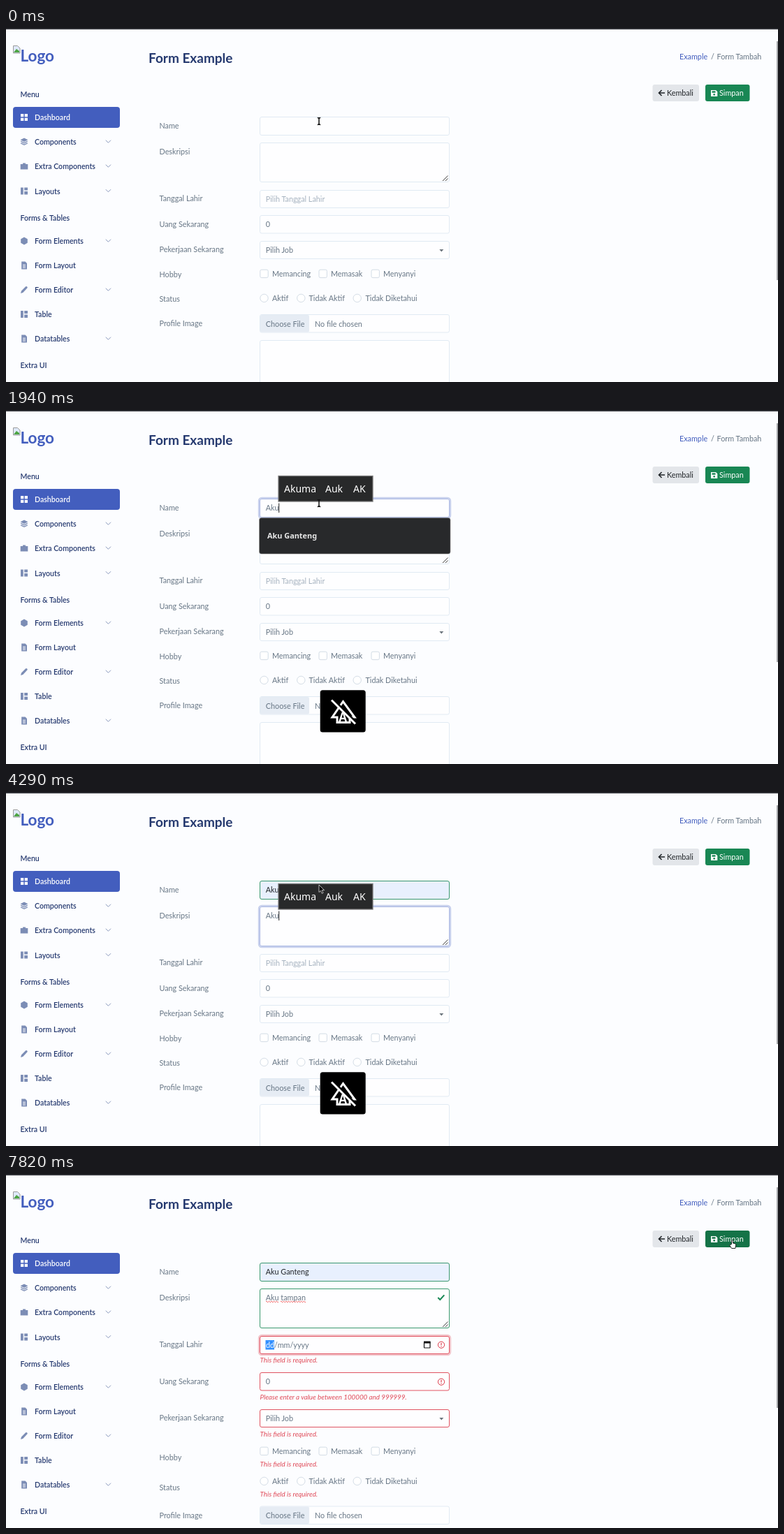
These frames come from a looping animation (1105x507 px, 7.99 s). An HTML page:

```html
<!DOCTYPE html>
<html lang="id">
<head>
<meta charset="utf-8">
<title>Form Example</title>
<style>
html, body { margin: 0; width: 100%; height: 100%; overflow: hidden; background: #fcfdff; }
svg { display: block; width: 1105px; height: 507px; }
text { font: 10.8px Lato, "Open Sans", sans-serif; fill: #677685; white-space: pre; }
.menu { font-size: 10.6px; font-weight: 600; fill: #25396f; }
.title { font-size: 19px; font-weight: 700; fill: #25396f; }
.logo { font-size: 22.5px; font-weight: 700; fill: #435ebe; }
.link { fill: #435ebe; }
.white { fill: #fff; }
.dark { fill: #212529; }
.faint { fill: #a5b2bf; }
.error { font-size: 9.8px; font-style: italic; fill: #e04a58; }
.option { font: 700 10.9px "Noto Sans", sans-serif; fill: #e8e8e8; }
.hint { font: 14px "Noto Sans", sans-serif; fill: #fff; }
.plain { font: 13.3px "Liberation Sans", sans-serif; fill: #fff; }
.caps { font: 700 17px "Noto Sans", sans-serif; fill: #fff; }
</style>
</head>
<body>
<svg id="stage" viewBox="0 0 1105 507"></svg>
<script>
const LOOP = 7990;
const BORDER = '#dce7f1', GREEN = '#198754', RED = '#dc3545', ICON = '#7c8db5';

const text = (x, y, s, cls = '') => `<text x="${x}" y="${y}" class="${cls}">${s}</text>`;
const rect = (x, y, w, h, fill, r = 0, extra = '') =>
  `<rect x="${x}" y="${y}" width="${w}" height="${h}" rx="${r}" fill="${fill}" ${extra}/>`;
const path = (d, fill, extra = '') => `<path d="${d}" fill="${fill}" ${extra}/>`;
const line = (d, color, width = 1) => path(d, 'none', `stroke="${color}" stroke-width="${width}"`);
const group = (x, y, body) => `<g transform="translate(${x} ${y})">${body}</g>`;
// Last value whose time has come
const at = (t, keys) => keys.reduce((value, [start, next]) => t >= start ? next : value, keys[0][1]);
const within = (t, start, end) => t >= start && t < end;

const icons = {
  grid: 'M-5-5h4.3v4.3h-4.3zM.7-5H5v4.3H.7zM-5 .7h4.3V5h-4.3zM.7.7H5V5H.7z',
  stack: 'M0-5.5L5.5-2.7 0 .1-5.5-2.7zM-5.5-.3l1.5-.7L0 1l4-2 1.5.7L0 2.5zM-5.5 2.2L-4 1.5l4 2 4-2 1.5.7L0 5z',
  bag: 'M-2-4.5h4v1.5h3.3V4.5h-10.6V-3H-2z',
  columns: 'M-5-5h3.8V5H-5zM.2-5H5v4H.2zM.2.4H5V5H.2z',
  hexagon: 'M0-5.6L4.8-2.8V2.8L0 5.6-4.8 2.8V-2.8z',
  file: 'M-3.8-5.5H1.5L4-3V5.5H-3.8z',
  pen: 'M-5 5l1-3.5L2.2-4.7q1-.8 2 .2t.2 2L-1.7 4z'
};
const menu = [
  [128, 'Dashboard', 'grid'], [163, 'Components', 'stack', 1], [198, 'Extra Components', 'bag', 1],
  [233.5, 'Layouts', 'columns', 1], [305, 'Form Elements', 'hexagon', 1], [340, 'Form Layout', 'file'],
  [375, 'Form Editor', 'pen', 1], [410, 'Table', 'columns'], [445, 'Datatables', 'file', 1]
];

function sidebar() {
  const items = menu.map(([y, label, icon, opens], i) =>
    group(26, y, path(icons[icon], i ? ICON : '#fff')
      + (icon === 'file' ? line('M-2-.8H2M-2 1.2H2M-2 3.2H2', '#fff', .9) : ''))
    + text(41, y + 4, label, i ? 'menu' : 'menu white')
    + (opens ? line(`M142.8 ${y - 2.3}l3.6 3.6 3.6-3.6`, ICON, .9) : ''));
  return path('M10.5 25.5h6l3.5 3.5v7h-9.5z', '#dfe9fb', 'stroke="#9a9a9a"')
    + path('M11 35l4-5 4 3v2z', '#4da544')
    + text(20.5, 47.5, 'Logo', 'logo')
    + rect(10, 113, 153, 30, '#435ebe', 4) + items.join('')
    + text(20.5, 98.5, 'Menu', 'menu') + text(20.5, 275.5, 'Forms &amp; Tables', 'menu')
    + text(20.5, 487, 'Extra UI', 'menu');
}

function header(hover) {
  return rect(0, 0, 1105, 2, '#303136')
    + text(204, 50, 'Form Example', 'title')
    + text(964, 45, 'Example', 'link') + text(1009, 45, '/') + text(1017.5, 45, 'Form Tambah')
    + rect(925.5, 81, 66.5, 24, '#e3e6ea', 3) + line('M943 93h-8M938.5 89l-4 4 4 4', '#212529', 1.6)
    + text(946, 97, 'Kembali', 'dark')
    + rect(1001, 81, 63.5, 24, hover ? '#157347' : GREEN, 3)
    + path('M1009 89h7l2.3 2.3v6.7h-9.3zM1010.5 90.3v2.4h5v-2.4zM1013.6 94a1.4 1.4 0 1 0 .1 0z', '#fff', 'fill-rule="evenodd"')
    + text(1021, 97, 'Simpan', 'white');
}

const glow = (y, h, rgb) => rect(362, y - 1.5, 274, h + 3, 'none', 4, `stroke="rgb(${rgb})" stroke-opacity=".28" stroke-width="2.4"`);
const field = (y, h, color = BORDER, fill = '#fefeff') => rect(363.5, y, 271, h, fill, 2.5, `stroke="${color}" stroke-width=".85"`);
const squiggle = (from, to, y) => line(`M${from} ${y}` + 'q.9-1.6 1.8 0t1.8 0'.repeat(Math.round((to - from) / 3.6)), '#e33', .8);
const alertIcon = y => `<circle cx="623" cy="${y}" r="4.6" fill="none" stroke="${RED}"/>`
  + line(`M623 ${y - 2.6}v3M623 ${y + 1.4}v1.2`, RED, 1.2);

function choices(y, labels, radius) {
  return labels.map(([x, label, textX]) =>
    rect(x, y - 5.8, 11.4, 11.4, '#fff', radius, `stroke="#cfd8e2" stroke-width=".9"`) + text(textX, y + 4, label)).join('');
}

function errors(money) {
  const required = [270, 375.5, 419, 462];
  return rect(371.5, 238, 12.5, 13.5, '#3390ff') + text(372, 248.7, '<tspan class="white">dd</tspan>/mm/yyyy')
    + rect(598.5, 240.5, 8.5, 8.5, 'none', .5, 'stroke="#111" stroke-width="1.2"') + rect(598, 239.5, 9.5, 3, '#111')
    + alertIcon(244.7) + alertIcon(money + 13.2)
    + line('M618.3 177l3 3 6-6.6', GREEN, 2)
    + required.map(y => text(363.5, y, 'This field is required.', 'error')).join('')
    + text(363.5, 323, 'Please enter a value between 100000 and 999999.', 'error');
}

function form(t, invalid, nameText, note) {
  const focus = at(t, [[0, ''], [390, 'name'], [3130, 'note'], [7550, '']]);
  const filled = t >= 2600;
  const [money, job, hobby, status, file] = invalid ? [284.5, 337.5, 397, 440, 476] : [268.5, 305.5, 352, 387, 410.5];
  const off = invalid ? 9 : .8;
  const edge = invalid ? RED : BORDER;
  const labels = [[140, 'Name'], [177, 'Deskripsi'], [244, 'Tanggal Lahir'], [money + 12, 'Uang Sekarang'],
    [job + 11.5, 'Pekerjaan Sekarang'], [hobby + off, 'Hobby'], [status + off, 'Status'], [file + 12.5, 'Profile Image']];
  let s = labels.map(([y, label]) => text(219.5, y + 4, label)).join('');

  if (focus === 'name') s += glow(127.5, 26, '67,94,190');
  s += field(127.5, 26, focus === 'name' ? '#a1afdf' : t >= 3130 ? GREEN : BORDER, filled ? '#e8f0fe' : '#fefeff')
    + text(371.8, 144.3, nameText, filled ? 'dark' : '');

  if (focus === 'note') s += glow(164.5, 56, '67,94,190');
  s += field(164.5, 56, focus === 'note' ? '#a1afdf' : invalid ? GREEN : BORDER)
    + line('M625 219l7.5-7.5M629 219l3.5-3.5', '#444', 1) + text(371.8, 181, note);
  if (t >= 4460) s += squiggle(372, 390, 183);
  if (t >= 6250) s += squiggle(393, 428, 183);

  if (invalid) s += glow(232.5, 25, '220,53,69');
  s += field(232.5, 25, edge)
    + field(money, 25.5, edge) + text(371.8, money + 16.5, '0')
    + field(job, 25, edge) + text(371.8, job + 16.5, 'Pilih Job')
    + path(`M620.3 ${job + 11.5}h6l-3 3.4z`, '#6c757d')
    + choices(hobby, [[363.8, 'Memancing', 381], [448, 'Memasak', 465], [523, 'Menyanyi', 540]], 2)
    + choices(status, [[363.8, 'Aktif', 381], [416.6, 'Tidak Aktif', 433.5], [497, 'Tidak Diketahui', 514.5]], 5.7)
    + field(file, 25.5) + rect(364, file + .5, 70, 24.5, '#e6ecf4', 2)
    + text(371.8, file + 17, 'Choose File') + text(442, file + 17, 'No file chosen');
  if (invalid) return s + errors(money);
  s += text(371.8, 248.7, 'Pilih Tanggal Lahir', 'faint') + field(447.5, 80);
  if (t >= 6760) s += rect(450, 448, 184, 14, '#f1f5fd');
  return s;
}

const options = ['Aku Ganteng', 'Contoh', 'Coba Lagi', 'Data Baru', 'Percobaan', 'Isian Form'];
function optionList(t) {
  if (!within(t, 390, 3000)) return '';
  const picked = t >= 2600, fading = t >= 2790;
  const count = t < 670 ? options.length : 1;
  const [x, w] = fading ? [363.5, 270.5] : [362.5, 273.5];
  const items = options.slice(0, count).map((label, i) => text(fading ? 375 : 374, 184 + i * 35.5, label, 'option'));
  return `<g opacity="${at(t, [[0, 1], [2790, .85], [2860, .5], [2930, .2]])}">`
    + rect(x, 154.5, w, 51.5 + (count - 1) * 35.5 - (fading ? 1.5 : 0), '#28292b', 3, 'stroke="#888" stroke-width=".6"')
    + (picked ? rect(x, 163.5, w, 34, '#404142') : '') + items.join('') + '</g>';
}

const suggestions = [
  [760, 1710, 379.5, 94, 118, 'hint', ['And', 387], ['As', 429], ['Also', 461]],
  [1790, 2600, 390, 94, 135, 'hint', ['Akuma', 398], ['Auk', 457], ['AK', 497]],
  [3720, 4210, 379.5, 131, 118, 'hint', ['And', 387], ['As', 429], ['Also', 461]],
  [4290, 4460, 390, 131, 135, 'hint', ['Akuma', 398], ['Auk', 457], ['AK', 497]],
  [5070, 5400, 422, 131, 175, 'plain', ['Tampa', 430], ['samba', 488], ['tamale', 546]],
  [6250, 7550, 427.5, 131, 174, 'plain', ['taipan', 435], ['Tampa', 489], ['timpani', 546]]
];
const popup = t => suggestions.filter(([start, end]) => within(t, start, end)).map(([, , x, y, w, cls, ...words]) =>
  rect(x, y + .5, w, 36.5, '#28292a', 0, 'stroke="#777" stroke-width="1.3"')
  + words.map(([word, wx]) => text(wx, y + 24.3, word, cls)).join('')).join('');

function capsIndicator(t) {
  if (!within(t, 580, 6760)) return '';
  const locked = t < 760 || within(t, 3510, 3800);
  return rect(449.7, 401.3, 65, 60.3, '#000', 3.5)
    + line('M482.5 417.5L467 440h7v7.5h18V440h7z', '#fff', 3)
    + text(476.3, 446, 'A', 'caps')
    + (locked ? '' : line('M468.5 414.5l33 33', '#000', 3) + line('M466 415.5l34 34', '#fff', 3));
}

function pointer(t) {
  if (t < 3130) return line('M445.8 128.5q2.2 0 2.2 1.5v7q0 1.5-2.2 1.5M450.2 128.5q-2.2 0-2.2 1.5M448 137q0 1.5 2.2 1.5', '#111', 1.5);
  const [x, y] = at(t, [[0, [448, 133]], [6580, [470, 135]], [6670, [580, 128]], [6760, [760, 116]],
    [6850, [930, 102]], [6940, [1020, 95]], [7030, [1048, 92]], [7200, [1045, 92]], [7460, [1042, 94]], [7640, [1039.5, 94.5]]]);
  if (x < 1001) return group(x, y, path('M0 0v10.5l2.4-2.2 1.8 4 1.8-.8-1.8-3.9h3.3z', '#000', 'stroke="#fff" stroke-width=".7"'));
  return group(x, y, path('M-1 6V.8q1-1.4 2 0v3.7l3.2.9q1.3.5 1 2L4.4 12H-.8L-3.8 7.6q0-1.5 1.5-.8z', '#fff', 'stroke="#111" stroke-width=".9"'));
}

const caretAfter = { '': 372, 'A': 379, 'Ak': 384.4, 'Aku': 390.2, 'Aku ': 393, 'Aku t': 397, 'Aku tam': 411,
  'Aku tamb': 417, 'Aku tamp': 417, 'Aku tamba': 423, 'Aku tampa': 422, 'Aku tampan': 428.2, 'Aku Ganteng': 433 };

function scene(t) {
  const nameText = at(t, [[0, ''], [670, 'A'], [930, 'Ak'], [1530, 'Aku'], [2600, 'Aku Ganteng']]);
  const note = at(t, [[0, ''], [3580, 'A'], [4030, 'Ak'], [4210, 'Aku'], [4460, 'Aku '], [4560, 'Aku t'],
    [4660, 'Aku tam'], [4820, 'Aku tamb'], [4900, 'Aku tamba'], [5400, 'Aku tamb'], [5840, 'Aku tam'],
    [5990, 'Aku tamp'], [6160, 'Aku tampa'], [6250, 'Aku tampan']]);
  const invalid = t >= 7640;
  const caretOn = at(t, [[0, 0], [390, 1], [2340, 0], [2600, 1], [5400, 0], [5840, 1], [6760, 0], [7200, 1], [7550, 0]]);
  const inNote = t >= 3130;
  const caret = caretOn ? rect(caretAfter[inNote ? note : nameText], inNote ? 170.5 : 133.5, 1, 13.5, '#222') : '';
  return header(t >= 7460) + sidebar() + form(t, invalid, nameText, note) + caret
    + optionList(t) + popup(t) + capsIndicator(t)
    + rect(1103, 19, 2, invalid ? 316 : 342, '#a3a5a8') + pointer(t);
}

const stage = document.getElementById('stage');
let shown = '';
function frame(now) {
  const next = scene(now % LOOP);
  if (next !== shown) stage.innerHTML = shown = next;
  requestAnimationFrame(frame);
}
frame(0);
</script>
</body>
</html>
```
